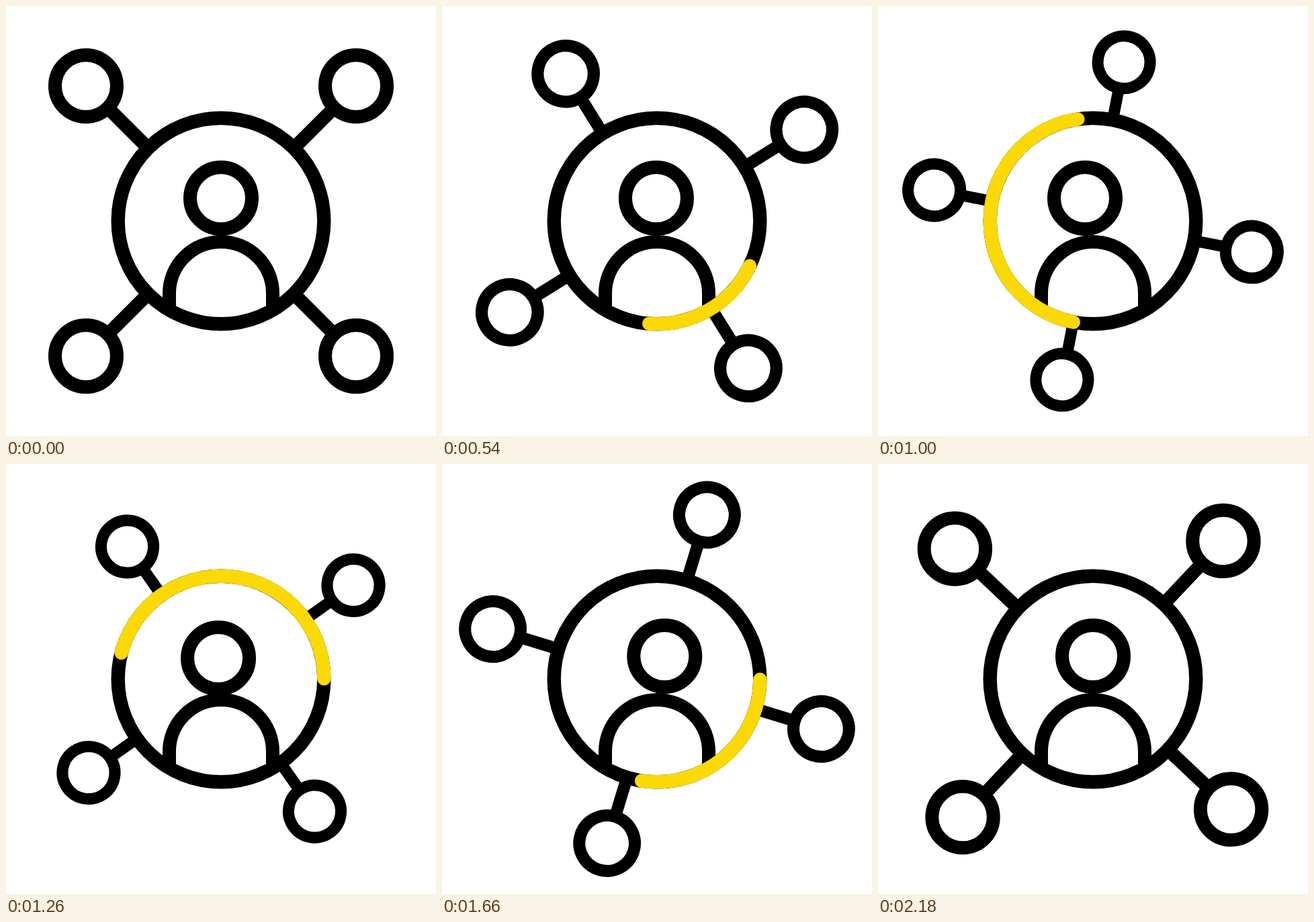
These frames come from a looping animation (640x640 px, 2.2 s). An HTML page with a canvas:

```html
<!DOCTYPE html>
<html lang="en">
<head>
<meta charset="utf-8">
<title>Network profile</title>
<style>
  html, body { margin: 0; width: 100%; height: 100%; overflow: hidden; background: #fff; }
  canvas { display: block; width: 640px; height: 640px; }
</style>
</head>
<body>
<canvas id="stage" width="640" height="640"></canvas>
<script>
const ctx = document.getElementById('stage').getContext('2d');
const LOOP = 2200, STEP = 40, RAD = Math.PI / 180;
const MID = 320, RING = 153.3, STROKE = 20, ORBIT = 284.3, NODE = 46;
const BLACK = '#000', YELLOW = '#fbd905';

// Progress from 0 to 1 between two steps, eased like cubic-bezier(x1, 0, x2, 1).
function ease(n, from, to, x1 = .53, x2 = .47) {
  const x = Math.min(1, Math.max(0, (n - from) / (to - from)));
  let low = 0, high = 1, t = x;
  for (let i = 0; i < 24; i++) {
    t = (low + high) / 2;
    const w = 1 - t;
    if (3 * t * w * (w * x1 + t * x2) + t * t * t < x) low = t;
    else high = t;
  }
  return t * t * (3 - 2 * t);
}

function stroke(color, width, path) {
  ctx.strokeStyle = color;
  ctx.lineWidth = width;
  ctx.beginPath();
  path();
  ctx.stroke();
}

const circle = (x, y, r) => ctx.arc(x, y, r, 0, 2 * Math.PI);

// Four satellites make half a turn while they shrink and grow back.
function drawNodes(n) {
  const turn = 180 * ease(n, 0, 59);
  const scale = 1 - .153 * (ease(n, 0, 23.6) - ease(n, 27.8, 59.2));
  for (let k = 0; k < 4; k++) {
    ctx.save();
    ctx.translate(MID, MID);
    ctx.rotate((turn + 45 + 90 * k) * RAD);
    stroke(BLACK, STROKE * scale, () => {
      ctx.moveTo(RING + 2, 0);
      ctx.lineTo((ORBIT - NODE) * scale, 0);
    });
    stroke(BLACK, STROKE * scale, () => circle(ORBIT * scale, 0, NODE * scale));
    ctx.restore();
  }
}

// The head sways left, dips across to the right and returns.
function drawPerson(n) {
  const cross = ease(n, 26.8, 36.8);
  const x = MID + 12 * (2 * cross - ease(n, 10, 22.4) - ease(n, 38.5, 51));
  const y = 286 + 3.5 * Math.sin(Math.PI * cross);
  stroke(BLACK, STROKE, () => circle(x, y, NODE));
  stroke(BLACK, STROKE, () => {
    ctx.moveTo(243, 446);
    ctx.arc(MID, 428, 77, Math.PI, 0);
    ctx.lineTo(397, 446);
  });
}

// A yellow arc runs round the ring; its tail sets off later than its head.
function drawRing(n) {
  const angle = progress => 21 + 477 * progress;
  const head = angle(ease(n, 3.8, 52.3, .24, .53));
  const tail = angle(ease(n, 9.3, 55.8, .46, .68));
  stroke(BLACK, STROKE + .4, () => circle(MID, MID, RING));
  if (head - tail < 6) return;
  ctx.lineCap = 'round';
  stroke(YELLOW, STROKE + .4, () => ctx.arc(MID, MID, RING, tail * RAD, head * RAD));
  ctx.lineCap = 'butt';
}

function draw() {
  const time = performance.now() % LOOP;
  // The motion advances in 40 ms steps, the first pose held a little longer.
  const n = Math.max(0, Math.floor((time - STEP / 2) / STEP));
  ctx.fillStyle = '#fff';
  ctx.fillRect(0, 0, 640, 640);
  drawNodes(n);
  drawPerson(n);
  drawRing(n);
  requestAnimationFrame(draw);
}
draw();
</script>
</body>
</html>
```
